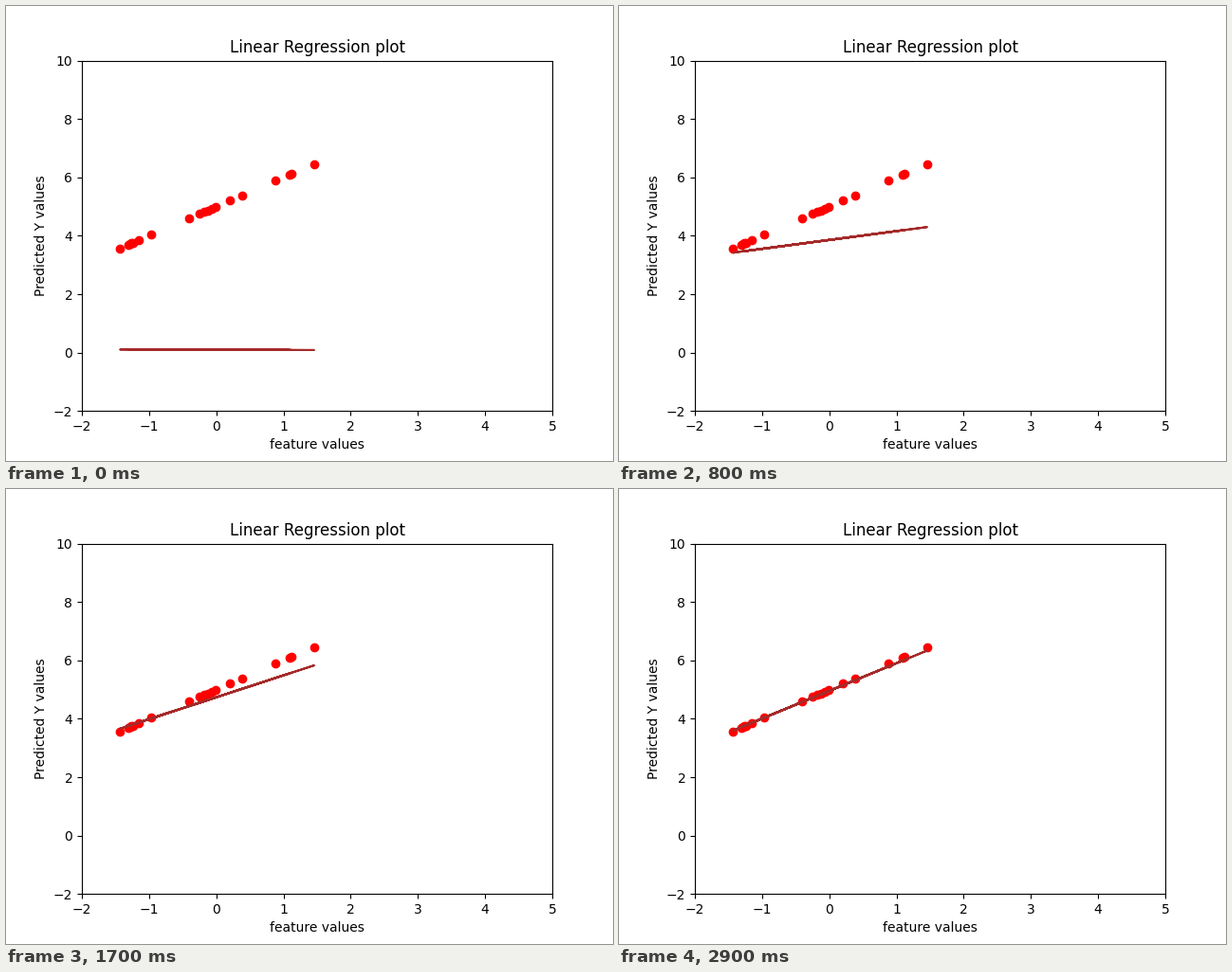
A matplotlib script that plays this animation: 640 by 480 pixels, repeating every 3 s.

```python
import matplotlib.pyplot as plt
import numpy as np
from matplotlib.animation import FuncAnimation

FRAMES = 30
INTERVAL = 100
STEPS_PER_FRAME = 10
RATE = 0.02


def make_samples():
    """Two dense runs plus a few lone samples, in mixed order."""
    lone = [-1.433, -1.15, -0.97, -0.40, 0.20, 0.38, 0.88, 1.09, 1.12, 1.457]
    left = np.linspace(-1.305, -1.24, 4)
    middle = np.linspace(-0.245, -0.01, 5)
    x = np.sort(np.concatenate([lone, left, middle]))
    # Striding makes the fitted line run back and forth over itself.
    return x[(np.arange(x.size) * 7 + 3) % x.size]


x = make_samples()
y = x + 5


def descend(slope, bias):
    """One gradient step on the mean squared error."""
    error = slope * x + bias - y
    return slope - RATE * np.mean(error * x), bias - RATE * np.mean(error)


def fit_history():
    slope, bias = descend(0.0, 0.0)
    history = [(slope, bias)]
    while len(history) < FRAMES:
        for _ in range(STEPS_PER_FRAME):
            slope, bias = descend(slope, bias)
        history.append((slope, bias))
    return history


history = fit_history()

fig, ax = plt.subplots(figsize=(6.4, 4.8), dpi=100)
ax.set(xlim=(-2, 5), ylim=(-2, 10), title="Linear Regression plot",
       xlabel="feature values", ylabel="Predicted Y values")
ax.scatter(x, y, color="red")
line, = ax.plot([], [], color="brown")


def update(frame):
    slope, bias = history[frame]
    line.set_data(x, slope * x + bias)
    return line,


anim = FuncAnimation(fig, update, frames=FRAMES, interval=INTERVAL,
                     repeat=True, repeat_delay=0)
plt.show()
```
